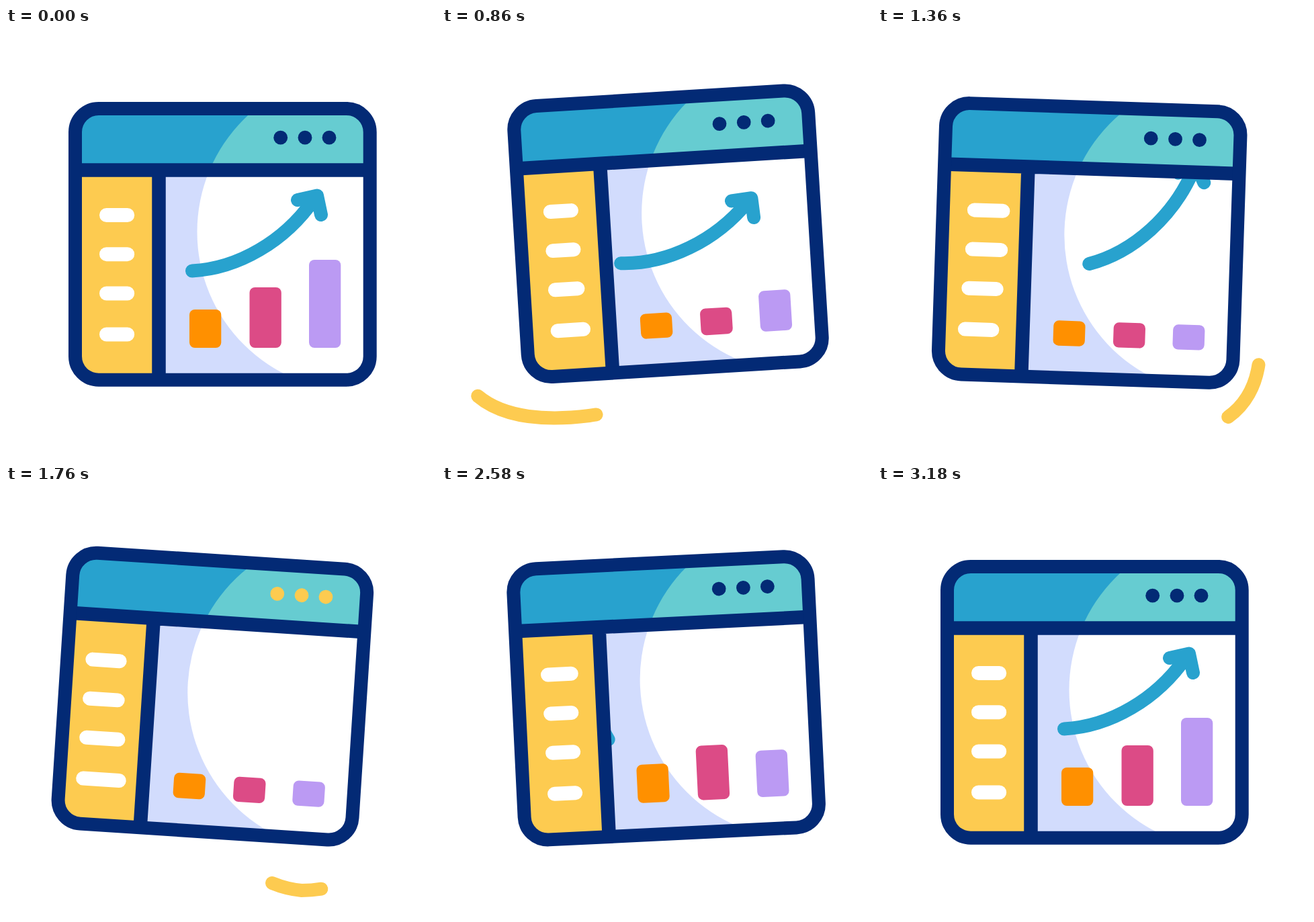
Recreate the animation shown at these times as an HTML page. Size 640x640 px, loop 3300 ms.

```html
<!DOCTYPE html>
<html lang="en">
<head>
<meta charset="utf-8">
<style>
  html, body { margin: 0; width: 100%; height: 100%; overflow: hidden; background: #fff; }
  svg { display: block; width: 100vw; height: 100vh; }
  path, line { fill: none; stroke-linecap: round; stroke-linejoin: round; stroke-width: 20; }
  .navy { stroke: #032a75; }
  .swoosh { stroke: #fdcb50; }
  .pill { stroke: #fff; stroke-width: 21; }
</style>
</head>
<body>
<svg viewBox="0 0 640 640">
  <defs>
    <clipPath id="inner"><rect x="103" y="120" width="439" height="404" rx="35"/></clipPath>
    <clipPath id="panel"><rect x="237" y="221" width="296" height="294"/></clipPath>
  </defs>
  <path class="swoosh" pathLength="1" d="M46 541C85 581 155 585 219 577Q250 573 276 564"/>
  <path class="swoosh" pathLength="1" d="M568 484C566 545 528 602 440 602Q418 600 396 591"/>
  <path class="swoosh" pathLength="1" d="M510 76C455 42 365 39 295 58"/>
  <g id="win">
    <g clip-path="url(#inner)">
      <rect x="103" y="120" width="439" height="404" fill="#d2dcfd"/>
      <circle cx="521.5" cy="303.5" r="237" fill="#fff"/>
      <svg x="0" y="0" width="640" height="211" viewBox="0 0 640 211">
        <rect width="640" height="211" fill="#28a2ce"/>
        <circle cx="521.5" cy="303.5" r="237" fill="#66ccd1"/>
      </svg>
      <rect x="103" y="211" width="125" height="313" fill="#fdcb50"/>
    </g>
    <g id="bars"></g>
    <g clip-path="url(#panel)">
      <path id="arrow" stroke="#28a2ce" d="M277 361.5C345 358 415 318 459 254M434 256L463 249.5L469 278"/>
    </g>
    <g id="pills"></g>
    <g id="dots"></g>
    <path class="navy" d="M103 211.5H542M227.5 211.5V523" style="stroke-width:20.5;stroke-linecap:butt"/>
    <rect class="navy" x="103" y="120" width="438.7" height="403.7" rx="35" fill="none" stroke-width="20"/>
  </g>
</svg>
<script>
const LOOP = 3300, START = 240, SPAN = 2940;
const $ = id => document.getElementById(id);

function add(parent, tag, attrs) {
  const el = document.createElementNS('http://www.w3.org/2000/svg', tag);
  set(el, attrs);
  return parent.appendChild(el);
}
function set(el, attrs) {
  for (const k in attrs) el.setAttribute(k, attrs[k]);
}

const ease = x => {
  x = Math.min(1, Math.max(0, x));
  return x * x * (3 - 2 * x);
};
// Eased track through [time, value] pairs
function track(t, keys) {
  let v = keys[0][1];
  for (let i = 1; i < keys.length; i++) {
    const [t0, v0] = keys[i - 1], [t1, v1] = keys[i];
    v += (v1 - v0) * ease((t - t0) / (t1 - t0));
  }
  return v;
}

const TILT = [[0, 0], [775, -3.9], [1350, 5], [2062, -3.9], [2855, 0]];
const BOB = [[0, 0], [455, -16.9], [1290, 0], [1755, -16.7], [2725, 0]];
const PILL_RIGHT = [[380, 0], [790, 11.5], [1200, 0], [1660, 14], [2090, 0]];
const PILL_LEFT = [[790, 0], [1200, 9], [1580, 11.7], [2090, 0]];

const bars = [[273, 57, '#ff9000'], [362.5, 90, '#dc4b86'], [451, 131, '#bb9af3']].map(
  ([x, full, fill]) => ({ full, el: add($('bars'), 'rect', { x, width: 47.3, rx: 8, fill }) }));
const pills = [278.5, 336.7, 395, 456].map(y => add($('pills'), 'line', { class: 'pill', y1: y, y2: y }));
const dots = [408.7, 445, 481].map(cx => add($('dots'), 'circle', { cx, cy: 163.2, r: 10.4 }));

// Head start, head end, tail start, tail end
const swooshTimes = [[300, 750, 560, 1060], [900, 1370, 980, 1840], [2420, 2800, 2550, 2930]];
const swooshes = [...document.querySelectorAll('.swoosh')];

function arrowAngle(u) {
  if (u < 780) return 9 * ease(u / 780);
  if (u < 1600) return 9 - 22.5 * ((u - 780) / 340) ** 2;
  return 96 * (1 - ease((u - 2100) / 800));
}

function mix(a, b, k) {
  return `rgb(${a.map((v, i) => Math.round(v + (b[i] - v) * k))})`;
}

function draw(u) {
  set($('win'), { transform: `translate(0 ${track(u, BOB)}) rotate(${track(u, TILT)} 322 90)` });
  set($('arrow'), { transform: `rotate(${arrowAngle(u)} 264 165)` });

  bars.forEach(({ full, el }, i) => {
    const shrink = 115 * i, grow = 1465 + 278 * i;
    const height = track(u, [[shrink, full], [shrink + 580, 37.3], [grow, 37.3], [grow + 813, full]]);
    set(el, { y: 476 - height, height });
  });

  pills.forEach((el, i) => {
    const t = u - 120 * (3 - i);
    set(el, { x1: 149.5 - track(t, PILL_LEFT), x2: 180.7 + track(t, PILL_RIGHT) });
  });

  dots.forEach((el, i) => {
    const t = u - 50 * i;
    const k = track(t, [[1150, 0], [1400, 1], [1900, 1], [2200, 0]]);
    set(el, { fill: mix([3, 42, 117], [253, 203, 80], k) });
  });

  swooshes.forEach((el, i) => {
    const [h0, h1, t0, t1] = swooshTimes[i];
    const head = ease((u - h0) / (h1 - h0)), tail = ease((u - t0) / (t1 - t0));
    set(el, {
      visibility: head > tail ? 'visible' : 'hidden',
      'stroke-dasharray': `${Math.max(0, head - tail)} 3`,
      'stroke-dashoffset': -tail
    });
  });
}

function tick() {
  const t = performance.now() % LOOP;
  draw(Math.min(SPAN, Math.max(0, t - START)));
  requestAnimationFrame(tick);
}
tick();
</script>
</body>
</html>
```
